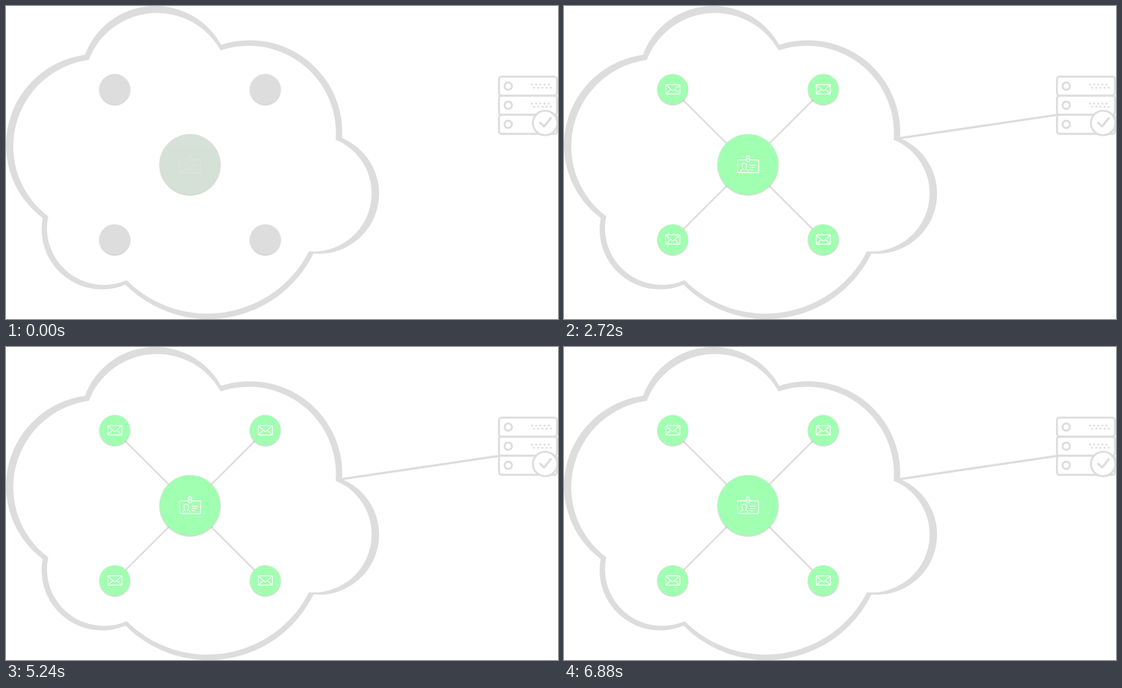
These frames come from a looping animation (993 by 564 pixels, 6960 ms). An HTML page:

```html
<!DOCTYPE html>
<html lang="en">
<head>
<meta charset="utf-8">
<title>Cloud messages</title>
<style>
  html, body { margin: 0; width: 100%; height: 100%; overflow: hidden; background: #fff; }
  svg { display: block; width: 993px; height: 564px; }
  .shadow { filter: drop-shadow(0 1.5px 1.2px rgba(0, 0, 0, .28)); }
  .gray { fill: #ddd; }
  .green { fill: #a1ffb1; }
  .wire { stroke: #ddd; fill: none; }
  .icon { stroke: #fff; fill: none; stroke-width: 1.4; stroke-linejoin: round; stroke-linecap: round; }
  .rack { stroke: #ddd; fill: #fff; stroke-width: 3.6; }
</style>
</head>
<body>
<svg viewBox="0 0 993 564">
  <defs>
    <g id="mail">
      <circle class="green" r="27.4"/>
      <g class="icon">
        <rect x="-12.7" y="-8.6" width="25.6" height="17" rx="1"/>
        <path d="M-12.2-8 L-1.5 1.6 Q0 2.8 1.5 1.6 L12.2-8 M-12.2 7.8 L-3.8 0 M12.2 7.8 L3.8 0"/>
      </g>
    </g>
  </defs>

  <line id="uplink" class="wire" stroke-width="4"/>
  <use id="courier" href="#mail"/>

  <g id="server">
    <g id="units"></g>
    <circle class="rack" cx="969.8" cy="210.8" r="22"/>
    <path class="wire" stroke-width="4" stroke-linecap="round" stroke-linejoin="round" d="M961 210.5 L968 217 L980 202"/>
  </g>

  <path class="gray" d="M142 88 A135 135 0 0 1 387 70 A166 166 0 0 1 604.5 238 A108.4 108.4 0 0 1 553 446
    A210 210 0 0 1 215 502 A108.5 108.5 0 0 1 66 382 A164 164 0 0 1 142 88Z"/>
  <path fill="#fff" d="M149 97 A131 131 0 0 1 386 80 A157 157 0 0 1 593 241 A104.6 104.6 0 0 1 545 442
    A205 205 0 0 1 217 494 A102.3 102.3 0 0 1 76 379 A157.5 157.5 0 0 1 149 97Z"/>

  <g id="wires"></g>
  <g id="nodes"></g>
  <g id="mails"></g>

  <g transform="translate(331 285.5)">
    <circle class="gray shadow" r="54.5"/>
    <g id="badge">
      <circle class="green" r="54.5"/>
      <g class="icon">
        <rect x="-18.8" y="-8.3" width="38" height="23" rx="2.2"/>
        <rect class="green" x="-2.8" y="-15.7" width="5.8" height="10.8" rx="2.8"/>
        <path d="M0-12.5 V-8.5 M3.5 1.2 H14 M3.5 5.4 H12 M3.5 9.5 H8.5"/>
        <path d="M-13.5 12.5 Q-13.5 9.3 -8.7 8.8 Q-11 5.5 -11 2 Q-11-2.2 -6.8-2.2 Q-2.6-2.2 -2.6 2 Q-2.6 5.5 -4.9 8.8 Q-.1 9.3 -.1 12.5"/>
      </g>
    </g>
  </g>
</svg>
<script>
const LOOP = 6960, STEP = 40;
const HUB = { x: 331, y: 286 }, REACH = 135.4;
const LINK = { x1: 331, y1: 278.4, x2: 939, y2: 188.5 };
const corners = [[-1, -1], [1, -1], [-1, 1], [1, 1]];
const $ = id => document.getElementById(id);

function add(parent, tag, attrs) {
  const el = document.createElementNS('http://www.w3.org/2000/svg', tag);
  set(el, attrs);
  return $(parent).appendChild(el);
}
function set(el, attrs) {
  for (const key in attrs) el.setAttribute(key, attrs[key]);
}
const progress = (t, from, to) => Math.min(1, Math.max(0, (t - from) / (to - from)));
const mix = (a, b, p) => a + (b - a) * p;
const place = (el, x, y) => el.setAttribute('transform', `translate(${x} ${y})`);

for (let row = 0; row < 3; row++) {
  const y = 127.2 + row * 34.4;
  add('units', 'rect', { class: 'rack', x: 886.8, y, width: 104.4, height: 34.4, rx: 5 });
  add('units', 'circle', { class: 'rack', cx: 903.5, cy: y + 17.2, r: 6.6 });
  for (let i = 0; i < 10 && row < 2; i++) {
    const low = i % 2;
    add('units', 'circle', { class: 'gray', cx: 946.2 + i * 3.75, cy: y + 14.3 + low * 5.7, r: 1.8 });
  }
}

for (const [sx, sy] of corners) {
  add('nodes', 'circle', { class: 'gray shadow', cx: HUB.x + sx * REACH, cy: HUB.y - .5 + sy * REACH, r: 27.5 });
}
const mails = corners.map(() => add('mails', 'use', { href: '#mail' }));
const wires = [-1, 1].map(() => add('wires', 'line', { class: 'wire', 'stroke-width': 3 }));

function draw(t) {
  // hub lights up
  $('badge').setAttribute('opacity', mix(.13, 1, progress(t, 40, 600)));

  // diagonals grow downwards from the upper nodes
  const grow = mix(-REACH, REACH, progress(t, 218, 960));
  wires.forEach((wire, i) => {
    const side = i ? 1 : -1;
    set(wire, {
      x1: HUB.x + side * REACH, y1: HUB.y - REACH,
      x2: HUB.x - side * grow, y2: HUB.y + grow
    });
  });

  // messages leave the hub
  const out = REACH * progress(t, 538, 1440);
  mails.forEach((mail, i) => {
    const [sx, sy] = corners[i];
    place(mail, HUB.x + sx * out, HUB.y - .5 + sy * out);
  });

  // link from cloud to server
  const link = progress(t, 2050, 2782);
  set($('uplink'), {
    x1: LINK.x1, y1: LINK.y1,
    x2: mix(LINK.x1, LINK.x2, link), y2: mix(LINK.y1, LINK.y2, link),
    visibility: link ? 'visible' : 'hidden'
  });

  // one message comes in, then one goes back
  const x = t < 5360 ? 766.5 - (t - 4640) * .315 : 785.5 + (t - 6320) * .234;
  const shown = t >= 4180 && t < 5240 || t >= 5480 && t < 6880;
  $('courier').setAttribute('visibility', shown ? 'visible' : 'hidden');
  place($('courier'), x, 207.8 - (x - 766.5) * .135);
}

const start = performance.now();
function tick(now) {
  const t = Math.max(0, now - start) % LOOP;
  draw(Math.floor(t / STEP) * STEP);
  requestAnimationFrame(tick);
}
draw(0);
requestAnimationFrame(tick);
</script>
</body>
</html>
```
